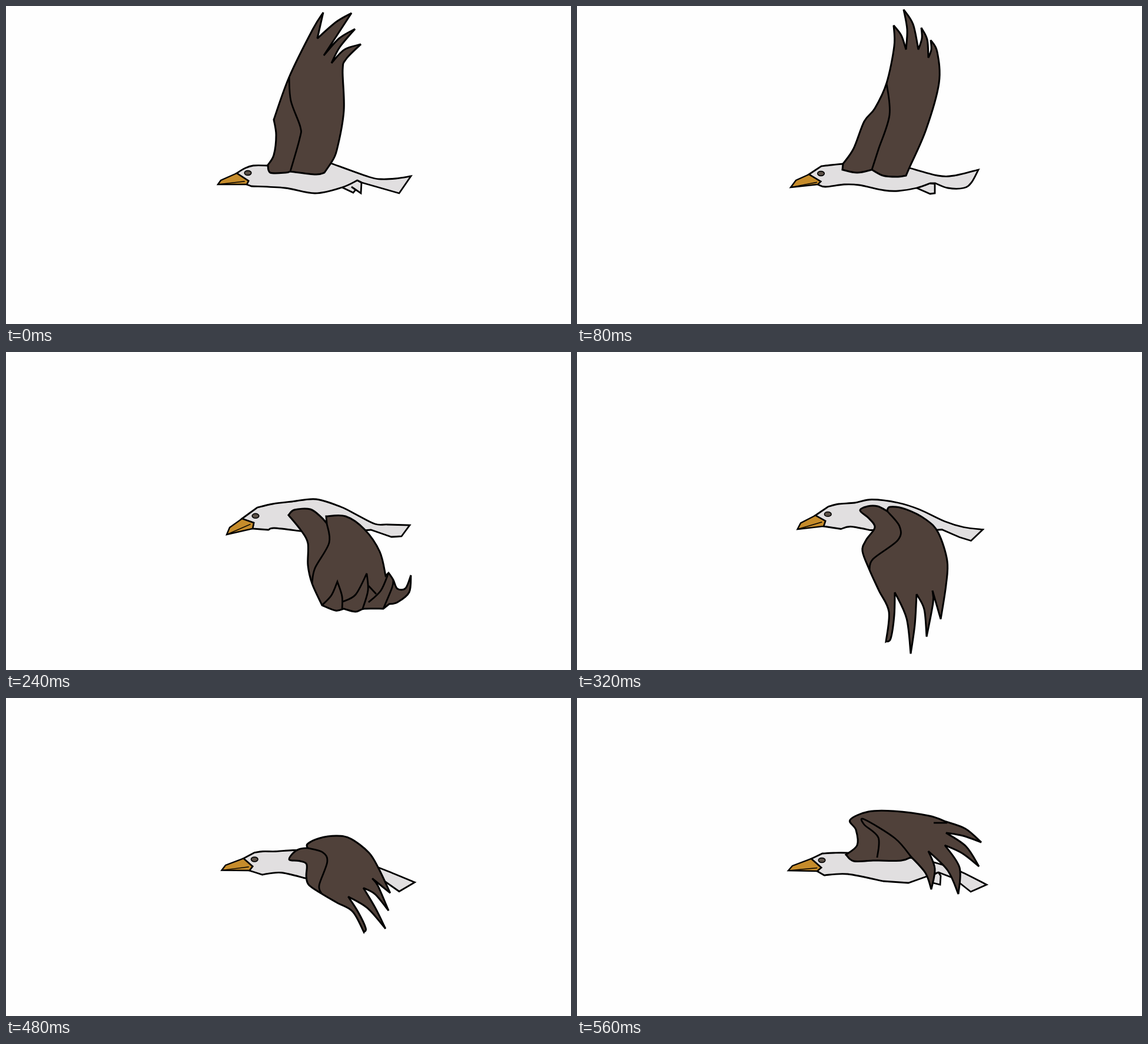
Recreate the animation shown at these times as an HTML page with a canvas. Size 960 by 540 pixels, loop 0.64 s.

```html
<!DOCTYPE html>
<html lang="en">
<head>
<meta charset="utf-8">
<title>Flying bird</title>
<style>
html, body { margin: 0; width: 100%; height: 100%; overflow: hidden; background: #fefefe; }
canvas { display: block; }
</style>
</head>
<body>
<canvas id="stage" width="960" height="540"></canvas>
<script>
const ctx = document.getElementById('stage').getContext('2d');
const STEP = 80;
const PLUMAGE = '#e1dfe0', WING = '#50413a', BEAK = '#c68c2b', EYE = '#5b5148';

// Points are "x,y"; a star marks a sharp corner, the rest are joined smoothly.
const parse = text => text.split(' ').map(item => {
  const [x, y] = item.split(',').map(parseFloat);
  return { x, y, corner: item.endsWith('*') };
});

// Beak points: tip, ridge, top of base, corner of mouth, bottom of base.
function makePose(eye, beak, body, wing, folds, foot) {
  return {
    eye: parse(eye), beak: parse(beak), body: parse(body),
    wing: parse(wing), folds: folds.map(parse), foot: foot ? parse(foot) : null
  };
}

const raised = makePose(
  '411,283.5',
  '360,303 365,296 392,284 412,297 409,303',
  '405,276 420,271 445,271* 552,267* 616,290 637,294 662,293 688,289* 668,318* 605,300* 597,296* 571,308 525,318 474,309 417,306*',
  '445,270* 455,253 459,219 455,193* 481,121 521,40 539,11* 529,55* 561,27 587,12* 540,84* 566,55 593,39* 567,70 553,97* 575,74 603,65* 578,90 572,109 574,178 562,245 552,267* 541,283* 526,286 483,281* 475,283 449,283',
  ['481,121 484,161 500,205 499,225 483,281'],
  '571,308 590,317 594,312 587,307 603,318 604,300 597,296'
);

const high = makePose(
  '414.5,284.5',
  '363,308 372,296 394,286 414,298 409,303',
  '415,272* 432,270 452,268* 565,275* 613,288 641,288 682,278* 670,300 657,309 630,309 609,301* 600,301* 577,309 546,314 522,313 479,304 454,303 422,307',
  '452,268* 470,242 488,196 506,174 526,131 539,68 538,33* 551,50 559,74* 561,40 555,6* 571,31 580,74* 586,55 585,37* 595,57 597,88* 602,74 601,58* 612,78 615,131 593,210 565,274* 559,288* 543,290 520,288 501,278* 476,283 451,278*',
  ['526,131 531,185 512,244 501,278'],
  '577,309 600,319 608,318 608,302 600,301'
);

const spread = makePose(
  '419,281',
  '370,305 376,297 399,283 416,293 414,302',
  '411,273 426,268 453,265 461,265* 507,290* 614,286* 644,290 683,285* 681,298 666,314* 621,308* 597,300* 579,309 542,314 479,304 436,305',
  '461,266* 488,268 505,259 520,246 538,197 545,142* 556,166 560,195* 570,160 575,106* 588,138 589,206* 606,185 617,160* 617,200 598,233* 633,213 653,196* 649,215 633,237* 628,262 614,286* 560,287 507,290* 483,284 461,277*',
  ['520,246 524,262 507,290'],
  '579,309 606,320 621,308 597,300'
);

const curled = makePose(
  '424,278.3',
  '375,310 380,298 401,283 421,290 419,300',
  '427,264* 453,258 486,254 527,250 569,263 595,276 627,292 648,293 686,294* 672,313* 655,314* 620,302* 608,303* 500,304* 456,299 446,302*',
  '480,277* 490,268 517,267 535,280 545,291* 544,279* 577,279 609,301 635,339 645,380* 650,375* 658,387 665,402 679,401 688,379* 685,408 665,425 651,428* 641,436* 609,436 594,441 574,436* 560,439 537,430* 520,393 513,362 513,325 502,304',
  [
    '545,291 549,324 525,367 520,393',
    '537,430 553,413 563,390* 571,415 571,438',
    '572,424 594,412 613,376* 615,405 606,436',
    '616,425 637,405 650,375',
    '658,387 656,400 641,436',
    '616,397 629,411'
  ]
);

const lowered = makePose(
  '428.5,272.5',
  '374,292 380,283 409,272 423,284 419,292',
  '427,261* 437,258 458,258 475,251 522,249 569,259 622,283 666,302 693,309* 667,328* 645,315* 620,301* 607,302* 497,301* 474,294 451,299*',
  '474,267 487,260 504,260 520,268* 525,261 552,265 586,282 607,304 622,350 620,390 611,446* 597,399* 598,419 587,475* 583,430 570,405* 567,455 560,503* 553,445 533,402* 532,440 526,478 518,483* 523,434 506,399 490,365 478,334 484,316 499,295 489,280',
  ['520,268 541,293 538,316 496,347 490,365']
);

const folded = makePose(
  '416,275.5',
  '359,293 366,285 398,273 415,288 408,294',
  '417,264* 436,263 459,263 500,266 540,268 560,270 610,280 648,293 696,317* 669,329* 640,306* 614,296* 563,314* 520,311* 460,299 420,301*',
  '457,266* 476,250 474,224 464,207 495,193 538,192 598,200 627,210* 660,222 687,245* 656,234 627,229* 661,252 683,286* 655,264 625,250* 650,288 648,333* 630,293 597,260* 608,290 602,325* 592,297 568,270* 551,276 513,276* 503,276 470,277',
  ['568,270 540,238 488,206 488,215 512,237 510,271', '606,212 629,212'],
  '605,314 617,317 618,302 614,296 600,303'
);

const midway = (a, b) => a.map((p, i) => ({
  x: (p.x + b[i].x) / 2, y: (p.y + b[i].y) / 2, corner: p.corner
}));

// Body halfway between two poses, with the lowered wing moved by a rule.
function between(a, b, move) {
  const swing = points => points.map(p => ({ ...p, ...move(p) }));
  return {
    eye: midway(a.eye, b.eye), beak: midway(a.beak, b.beak), body: midway(a.body, b.body),
    wing: swing(lowered.wing), folds: lowered.folds.map(swing), foot: null
  };
}

const stretched = between(curled, lowered, ({ x, y }) => ({
  x: x + 7, y: 264 + (y - 262) * 1.03
}));

const lifting = between(lowered, folded, ({ x, y }) => {
  const dx = (x - 500) * 0.8, dy = (y - 270) * 0.8;
  const cos = Math.cos(0.6), sin = Math.sin(0.6);
  return { x: 500 + dx * cos + dy * sin, y: 265 + dy * cos - dx * sin };
});

const poses = [raised, high, spread, curled, stretched, lowered, lifting, folded];

function trace(points, closed, smooth) {
  const n = points.length;
  const at = i => closed ? points[(i + n) % n] : points[Math.max(0, Math.min(n - 1, i))];
  ctx.beginPath();
  ctx.moveTo(points[0].x, points[0].y);
  for (let i = 0; i < (closed ? n : n - 1); i++) {
    const p = at(i), q = at(i + 1);
    const before = p.corner ? p : at(i - 1), after = q.corner ? q : at(i + 2);
    if (smooth) {
      ctx.bezierCurveTo(
        p.x + (q.x - before.x) / 6, p.y + (q.y - before.y) / 6,
        q.x - (after.x - p.x) / 6, q.y - (after.y - p.y) / 6, q.x, q.y
      );
    } else {
      ctx.lineTo(q.x, q.y);
    }
  }
  if (closed) ctx.closePath();
}

function paint(points, fill, width, smooth = true) {
  trace(points, !!fill, smooth);
  if (fill) {
    ctx.fillStyle = fill;
    ctx.fill();
  }
  ctx.lineWidth = width;
  ctx.stroke();
}

function drawHead({ eye: [eye], beak }) {
  const [tip, , , hinge] = beak;
  const along = k => ({ x: tip.x + (hinge.x - tip.x) * k, y: tip.y + (hinge.y - tip.y) * k });
  paint(beak, BEAK, 2.4, false);
  paint([along(0.05), along(0.25), along(0.88)], null, 1.5, false);
  ctx.beginPath();
  ctx.ellipse(eye.x, eye.y, 5.8, 3.9, 0, 0, Math.PI * 2);
  ctx.fillStyle = EYE;
  ctx.fill();
  ctx.lineWidth = 1.6;
  ctx.stroke();
}

function drawBird(pose) {
  const [, , top, hinge, bottom] = pose.beak.map(p => ({ ...p, corner: true }));
  ctx.fillStyle = '#fefefe';
  ctx.fillRect(0, 0, 960, 540);
  ctx.strokeStyle = '#000';
  ctx.miterLimit = 3;
  if (pose.foot) paint(pose.foot, PLUMAGE, 2.8, false);
  paint([top, ...pose.body, bottom, hinge], PLUMAGE, 2.8);
  drawHead(pose);
  paint(pose.wing, WING, 3);
  for (const fold of pose.folds) paint(fold, null, 2.8);
}

const start = performance.now();
function tick() {
  const step = Math.floor((performance.now() - start) / STEP);
  drawBird(poses[step % poses.length]);
  requestAnimationFrame(tick);
}
tick();
</script>
</body>
</html>
```
